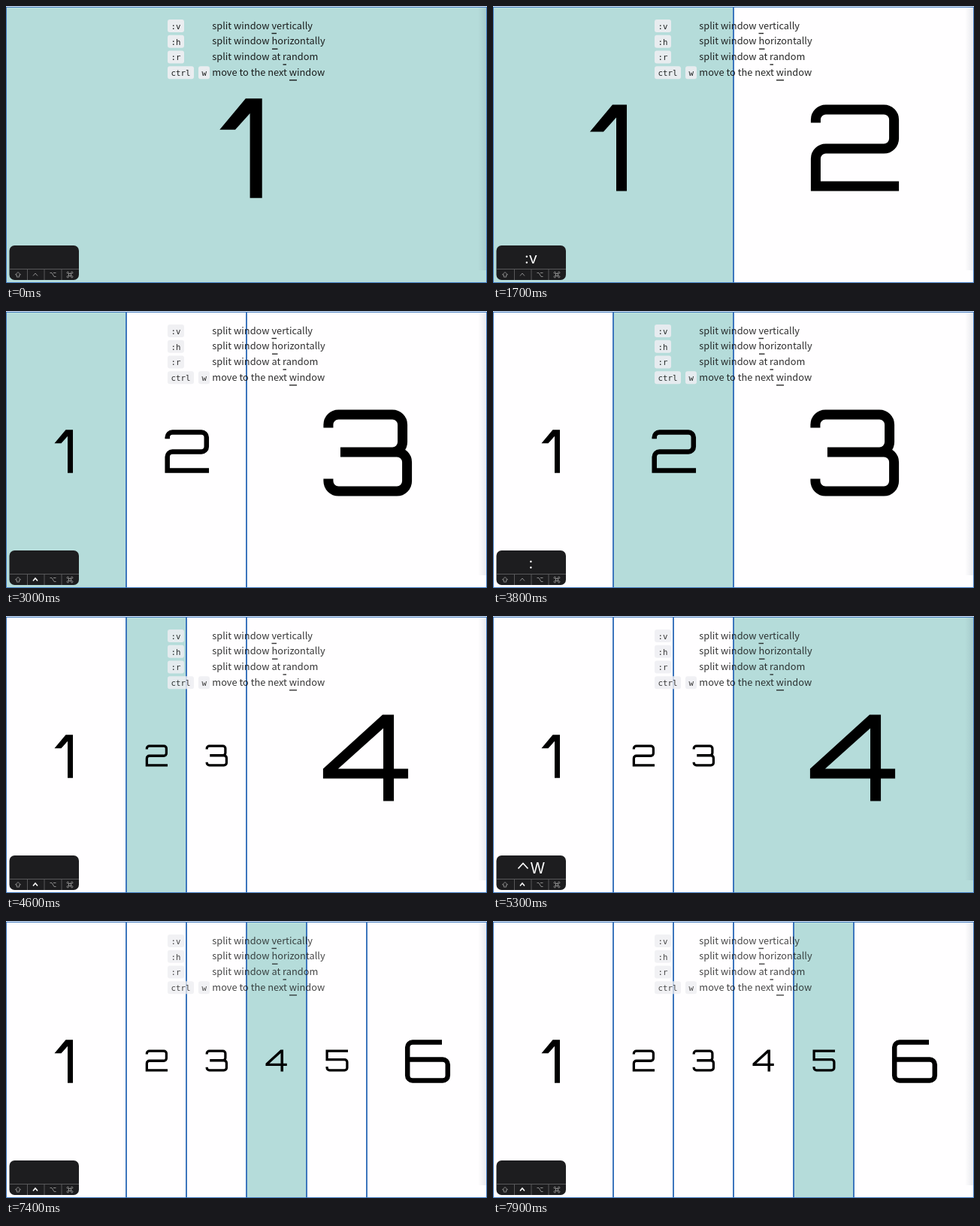
Write an HTML page that moves like this. It is 640 px wide and 369 px high and loops after 8 s.

```html
<!DOCTYPE html>
<html lang="en">
<head>
<meta charset="utf-8">
<title>Window splitting</title>
<style>
html, body { margin: 0; width: 100%; height: 100%; overflow: hidden; background: #e4eaf2; }
svg { display: block; width: 100vw; height: 100vh; }
.tip { font: 12.8px "Noto Sans CJK JP", "Noto Sans CJK SC", "Noto Sans CJK", sans-serif; fill: #111; }
.chip { font: 10.8px "DejaVu Sans Mono", monospace; fill: #111; }
.typed { font: 20px Inter, sans-serif; fill: #fff; }
.icon { fill: none; stroke: #8c8c8c; stroke-width: 1; }
.lit { stroke: #fff; stroke-width: 1.5; }
</style>
</head>
<body>
<svg viewBox="0 0 640 369">
  <defs>
    <linearGradient id="shade">
      <stop offset="0" stop-color="#203050" stop-opacity="0"/>
      <stop offset="1" stop-color="#203050" stop-opacity=".1"/>
    </linearGradient>
  </defs>
  <g id="panes"></g>
  <rect x="628" y="2" width="11" height="350" fill="url(#shade)"/>
  <g id="help"></g>
  <rect x="4.5" y="319" width="92.5" height="46" rx="7" fill="#1d1d1f"/>
  <path d="M5 350.5H97M28.5 351V365M51 351V365M74 351V365" stroke="#58585a" fill="none"/>
  <g class="icon">
    <path d="M16 354.5L19.5 358H17.7V361H14.3V358H12.5Z"/>
    <path id="ctrl" d="M36 359.5L39 356L42 359.5"/>
    <path d="M58.5 355.5H61L64 360.5H66.5M63 355.5H66.5"/>
    <path d="M83.5 356.5H86.5V359.5H83.5ZM83.5 356.5H82.3A1.2 1.2 0 1 1 83.5 355.3ZM86.5 356.5V355.3A1.2 1.2 0 1 1 87.7 356.5ZM86.5 359.5H87.7A1.2 1.2 0 1 1 86.5 360.7ZM83.5 359.5V360.7A1.2 1.2 0 1 1 82.3 359.5Z"/>
  </g>
  <g id="keys"></g>
</svg>
<script>
const LOOP = 8000, FADE = 200, TOP = 1, HEIGHT = 368;
const $ = id => document.getElementById(id);

// Digit shapes: cap height 115, x measured from the pane centre.
const fill = d => `<path d="${d}" fill-rule="evenodd"/>`;
const line = d => `<path d="${d}" fill="none" stroke="#000" stroke-width="13"/>`;
const turn = (sweep, x, y) => `A13.5 13.5 0 0 ${sweep} ${x} ${y}`;
const digits = [
  fill('M-1 0H18V115H4V17L-13 36H-31Z'),
  line(`M-50.5 24V20${turn(1, -37, 6.5)}H40${turn(1, 53.5, 20)}V45${turn(1, 40, 58.5)}H-37${turn(0, -50.5, 72)}V108.5H60`),
  line(`M-51 24V20${turn(1, -37.5, 6.5)}H34${turn(1, 47.5, 20)}V43${turn(1, 34, 56.5)}H-35M34 56.5H40${turn(1, 53.5, 70)}V95${turn(1, 40, 108.5)}H-37.5${turn(1, -51, 95)}V92`),
  fill('M21 0H36V72H55V85H36V115H22V85H-58V72ZM22 18V72H-38Z'),
  line(`M60 6.5H-51.5V52H42${turn(1, 55.5, 65.5)}V95${turn(1, 42, 108.5)}H-38${turn(1, -51.5, 95)}V89`),
  line(`M40 6.5H-38${turn(0, -51.5, 20)}V95${turn(0, -38, 108.5)}H42${turn(0, 55.5, 95)}V66${turn(0, 42, 52.5)}H-51.5`)
];

// Each entry: time, key display, control held, action.
const events = [
  [800, ':', 0], [1000, ':v', 0], [1100, ':v', 0, 'split'],
  [2200, ':v:', 0], [2400, ':v:v', 0], [2600, ':v:v', 0, 'split'],
  [3000, '', 1], [3100, '^W', 1, 'next'], [3600, '', 0],
  [3800, ':', 0], [3900, ':v', 0], [4000, ':v', 0, 'split'],
  [4600, '', 1], [4800, '^W', 1, 'next'], [5000, '', 1], [5100, '^W', 1, 'next'], [5600, '', 0],
  [5700, ':', 0], [5900, ':v', 0], [6000, ':v', 0, 'split'],
  [6400, ':v:', 0], [6600, ':v:v', 0], [6700, ':v:v', 0, 'split'],
  [7400, '', 1], [7500, '^W', 1, 'next'], [7900, '', 1]
];

function stateAt(time) {
  const s = { widths: [640], focus: 0, moved: -FADE, keys: '', ctrl: 0 };
  for (const [at, keys, ctrl, action] of events) {
    if (at > time) break;
    Object.assign(s, { keys, ctrl });
    if (action === 'split') {
      const half = s.widths[s.focus] / 2;
      s.widths.splice(s.focus, 1, half, half);
    } else if (action === 'next') {
      s.focus++;
      s.moved = at;
    }
  }
  return s;
}

function pane(x, w, i, glow) {
  const scale = 0.36 * Math.min(w, HEIGHT) / 115;
  const top = TOP + HEIGHT / 2 + 4 * scale - 57.5 * scale;
  const tint = [255 - 74 * glow, 254 - 34 * glow, 255 - 37 * glow].map(Math.round);
  return `<rect x="${x + .5}" y="${TOP + .5}" width="${w - 1}" height="${HEIGHT - 1}" fill="rgb(${tint})" stroke="#3d76bd"/>
    <g transform="translate(${x + w / 2} ${top}) scale(${scale})">${digits[i]}</g>`;
}

const chip = (x, y, w, label) =>
  `<rect x="${x}" y="${y - 8.5}" width="${w}" height="17" rx="3" fill="#eeeef2"/>
   <text class="chip" x="${x + 4.5}" y="${y + 4.3}">${label}</text>`;

// Label, text, then start and width of the underlined letter.
$('help').innerHTML = [
  [':v', 'split window vertically', 353.5, 6.5],
  [':h', 'split window horizontally', 354, 7.5],
  [':r', 'split window at random', 368.5, 4.5],
  ['ctrl', 'move to the next window', 377, 10]
].map(([key, text, x, w], i) => {
  const y = 26.5 + 20.75 * i;
  return chip(215, y, i < 3 ? 22 : 35, key) + (i < 3 ? '' : chip(256, y, 15, 'w')) +
    `<text class="tip" x="274.3" y="${y + 4}">${text}</text>
     <rect x="${x}" y="${y + 9.3}" width="${w}" height="1.4" fill="#111"/>`;
}).join('');

function draw(time) {
  const s = stateAt(time);
  const p = Math.min(1, (time - s.moved) / FADE), eased = 1 - (1 - p) ** 2;
  let x = 0;
  $('panes').innerHTML = s.widths.map((w, i) => {
    const glow = i === s.focus ? eased : i === s.focus - 1 ? 1 - eased : 0;
    const html = pane(x, w, i, glow);
    x += w;
    return html;
  }).join('');
  $('help').setAttribute('opacity', .98 - .035 * s.widths.length);
  $('ctrl').setAttribute('class', s.ctrl ? 'lit' : '');
  $('keys').innerHTML = s.keys === '^W'
    ? '<path d="M33.5 336.5L40 329.5L46.5 336.5" fill="none" stroke="#fff" stroke-width="1.7"/><text class="typed" x="49.5" y="342.5">W</text>'
    : `<text class="typed" x="50.5" y="343" text-anchor="middle">${s.keys}</text>`;
}

const start = performance.now();
function tick() {
  draw((performance.now() - start) % LOOP);
  requestAnimationFrame(tick);
}
tick();
</script>
</body>
</html>
```
